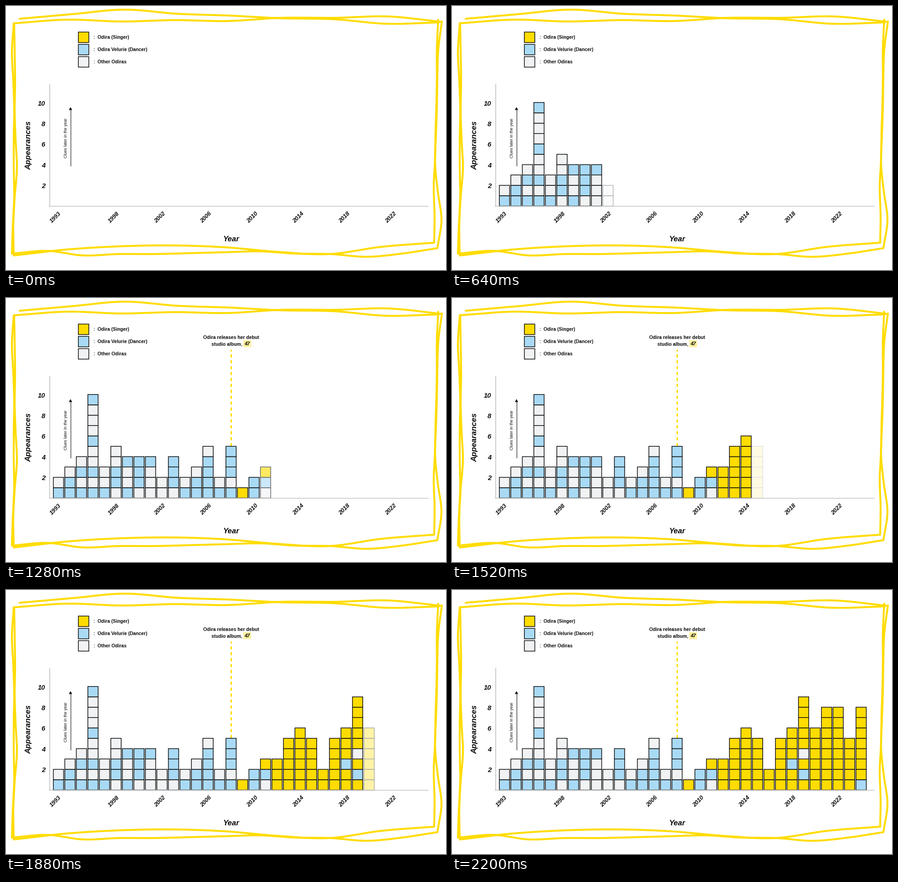
Recreate the animation shown at these times as a matplotlib script. Size 966 by 580 pixels, loop 2.48 s.

```python
import numpy as np
import matplotlib.pyplot as plt
from matplotlib.animation import FuncAnimation
from matplotlib.patches import Polygon, Rectangle

W, H, DPI = 966, 580, 100
FRAMES, STEP = 62, 40
REVEAL = 55            # frames until the last column is solid
PX = 72 / DPI

YELLOW, BLUE, GREY = "#ffdc00", "#a9daf5", "#f0f2f4"
INK, AXIS = "#0c0c0c", "#c6c6c6"
FILL = {"y": YELLOW, "b": BLUE, "g": GREY}

# One word per year from 1993, cells listed from the bottom up
YEARS = (
    "bg bbg bgbg bgbggbgggb bgg gbbgg bggb gbbb gggb gg gbbb bg bbg bbbbg bg "
    "bgbbb y bb gby yyy yyyyy yyyyyy yyyyy yy yyyyy yybyyy ybygyyyyy yyyyyy "
    "yyyyyyyy yyyyyyyy yyyyy byyyyyyy"
).split()
X0, PITCH, BASE = 103.9, 25.26, 439.5
CELL_W, CELL_H = 22.6, 22.75
NOTE_COL = 15

fig = plt.figure(figsize=(W / DPI, H / DPI), dpi=DPI, facecolor="white")
ax = fig.add_axes([0, 0, 1, 1])
ax.set_xlim(0, W)
ax.set_ylim(H, 0)
ax.axis("off")


def tint(color, a):
    """Blend a hex colour with white."""
    rgb = np.array([int(color[k:k + 2], 16) for k in (1, 3, 5)]) / 255
    return 1 + (rgb - 1) * a


def label(x, y, s, size, weight="bold", style="normal", ha="left", rot=0):
    return ax.text(x, y, s, fontsize=size * PX, family="Liberation Sans",
                   weight=weight, style=style, color=INK, ha=ha,
                   va="baseline", rotation=rot, rotation_mode="anchor", zorder=5)


def line(xs, ys, color, width, z=1, **kw):
    return ax.plot(xs, ys, color=color, lw=width * PX, zorder=z, **kw)[0]


def box(x, y, w, h, fill, edge=INK, width=1.5, z=2):
    return ax.add_patch(Rectangle((x, y), w, h, fc=fill, ec=edge, snap=False,
                                  lw=width * PX, zorder=z))


def scrawl(start, end, *knots):
    """Smooth hand-drawn curve through evenly spaced knots."""
    k = np.array(knots, float)
    slope = np.gradient(k)
    t = np.linspace(0, len(k) - 1, 200)
    i = np.minimum(t.astype(int), len(k) - 2)
    u = t - i
    rise = k[i + 1] - k[i]
    bend = u * (1 - u) * ((1 - u) * (slope[i] - rise) - u * (slope[i + 1] - rise))
    return np.linspace(start, end, 200), k[i] + u * rise + bend


def draw_border():
    across = [
        scrawl(30, 950, 28, 18, 8, 17, 21, 27, 29, 39, 36),
        scrawl(17, 957, 38, 30, 34, 31, 33, 26, 26, 23, 35),
        scrawl(13, 947, 544, 538, 548, 545, 545, 543, 541, 539, 544, 545, 551, 544, 532),
        scrawl(18, 940, 548, 535, 528, 526, 530, 540, 545, 529, 520),
    ]
    down = [
        scrawl(38, 544, 17, 13, 16, 18, 17, 17, 18, 15, 13),
        scrawl(38, 548, 18, 19, 20, 19, 21, 24, 19, 16, 17),
        scrawl(34, 532, 957, 949, 947, 946, 944, 942, 948, 956, 947),
        scrawl(30, 520, 949, 946, 946, 945, 943, 942, 939, 941, 940),
    ]
    for xs, ys in across + [curve[::-1] for curve in down]:
        line(xs, ys, YELLOW, 4.2, solid_capstyle="round")


def draw_legend():
    rows = [(YELLOW, "Odira (Singer)"), (BLUE, "Odira Velurie (Dancer)"),
            (GREY, "Other Odiras")]
    for k, (color, name) in enumerate(rows):
        y = 57.3 + 27 * k
        box(158.8, y, 23, 23, color)
        label(192, y + 14.7, ":", 10.4)
        label(201, y + 14.7, name, 10.4)


def draw_axes():
    line([95.5, 95.5], [172, 440], AXIS, 1.8, z=4)
    line([94.6, 927], [439.8, 439.8], AXIS, 1.6, z=4)
    for n in range(2, 11, 2):
        label(86, 445.3 - 22.65 * n, str(n), 14.8, style="italic", ha="right")
    label(101, 477, "1993", 13, style="italic", rot=45)
    for k in range(7):
        label(229 + 101.3 * k, 477, str(1998 + 4 * k), 13, style="italic", rot=45)
    label(494.5, 517, "Year", 16.7, style="italic", ha="center")
    label(54.7, 306.5, "Appearances", 17.1, style="italic", ha="center", rot=90)
    label(134, 334, "Clues later in the year", 9.05, weight="normal", rot=90)
    line([141.5, 141.5], [350.5, 227], INK, 1.1)
    ax.add_patch(Polygon([(141.6, 222), (138, 228.5), (145.2, 228.5)],
                         fc=INK, lw=0, zorder=2))


def make_note():
    return [
        label(494, 90.3, "Odira releases her debut", 10.5, ha="center"),
        label(451, 104.3, "studio album,", 10.4),
        box(521, 92.5, 17, 15.5, "#fff0a0", edge="none", width=0),
        label(523, 104.3, "47", 11, style="italic"),
        line([494, 494], [113, 325], YELLOW, 3, dash_capstyle="butt",
             ls=(1, (7 / 3, 6 / 3))),
    ]


def make_columns():
    return [[(box(X0 + PITCH * i, BASE - CELL_H * (j + 1), CELL_W, CELL_H,
                  FILL[c], z=3), FILL[c]) for j, c in enumerate(word)]
            for i, word in enumerate(YEARS)]


draw_border()
draw_legend()
draw_axes()
note = make_note()
columns = make_columns()


def update(f):
    shown = len(columns) * min(f / REVEAL, 1)
    for i, column in enumerate(columns):
        a = np.clip(shown - i, 0, 1)
        for cell, color in column:
            cell.set_visible(a > 0)
            cell.set_facecolor(tint(color, a))
            cell.set_edgecolor(tint(INK, a))
    for part in note:
        part.set_alpha(float(np.clip(shown - NOTE_COL, 0, 1)))
    return []


anim = FuncAnimation(fig, update, frames=FRAMES, interval=STEP,
                     init_func=lambda: update(0), repeat=True, repeat_delay=0)
plt.show()
```
